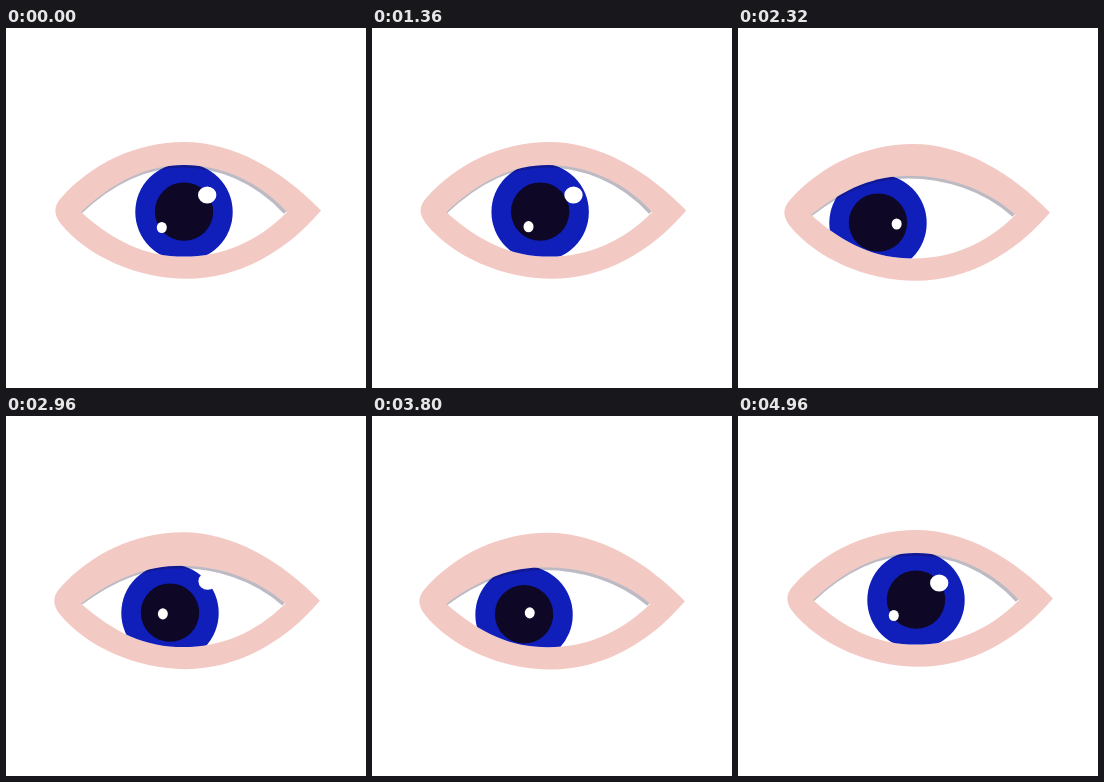
An HTML page that plays this animation: 360x360 px, repeating every 5 s.

```html
<!DOCTYPE html>
<html lang="en">
<head>
<meta charset="utf-8">
<title>Eye</title>
<style>
  html, body { margin: 0; width: 100%; height: 100%; overflow: hidden; background: #fff; }
  svg { display: block; width: 100%; height: 100%; }
</style>
</head>
<body>
<svg viewBox="0 0 360 360">
  <defs><clipPath id="slit"><path id="opening"/></clipPath></defs>
  <path id="skin" fill="#f3c9c4"/>
  <g clip-path="url(#slit)">
    <rect width="360" height="360" fill="#fff"/>
    <g id="iris">
      <circle r="48.7" fill="#101eba"/>
      <circle cy="-.4" r="29.2" fill="#0e0726"/>
    </g>
    <ellipse id="glint" rx="9.2" ry="8.6" fill="#fff"/>
    <ellipse id="spark" rx="5" ry="5.6" fill="#fff"/>
    <path id="shade" fill="none" stroke="#140a28" stroke-width="4.6"/>
  </g>
</svg>
<script>
const LOOP = 5000, STEP = 40;
const el = id => document.getElementById(id);
const [opening, skin, iris, glint, spark, shade] =
  ['opening', 'skin', 'iris', 'glint', 'spark', 'shade'].map(el);

// Progress from 0 to 1 between two times, plain and eased
const ramp = (t, from, to) => Math.min(1, Math.max(0, (t - from) / (to - from)));
const ease = (t, from, to) => {
  const p = ramp(t, from, to);
  return p * p * (3 - 2 * p);
};
const mix = (a, b, p) => a + (b - a) * p;

// Look left, lower the gaze, wander a little, settle below, return
function gaze(t) {
  const wander = ease(t, 2440, 2820) - ease(t, 2980, 3360);
  const settle = ease(t, 3600, 4120);
  const away = 1 - ease(t, 4680, 4920);
  const x = mix(-38 * ease(t, 1310, 1460) + 24 * wander, -1.5, settle);
  const y = mix(11 * ease(t, 1920, 2200) + 2 * wander, 22, settle);
  return [x * away, y * away];
}

// Quick closing, slow opening
const blink = t => ease(t, 600, 720) * (1 - ramp(t, 760, 1000)) ** 3;

function place(node, x, y) {
  node.setAttribute('transform', `translate(${x} ${y})`);
}

function draw(t) {
  const [dx, dy] = gaze(t), shut = blink(t);
  const sx = dx * .08, sy = dy * .18;

  // Inner edge of the lids
  const left = 75 + 8 * shut + sx + dy * .08;
  const right = 281 - 7 * shut + sx - dy * .04;
  const corner = 184 + 7 * shut + sy + dy * .08;
  const top = 137 + 83 * shut + sy + dy * .8;
  const low = 228.6 - 8.6 * shut + sy;
  const mid = 178 + sx, peak = mid + dx * .08;
  const bend = y => mix(corner, y, .7);
  const upper = `M${left} ${corner}C${left + 35} ${bend(top)} ${peak - 35} ${top} ${peak} ${top}` +
    `S${right - 30} ${bend(top)} ${right} ${corner}`;
  opening.setAttribute('d', upper +
    `C${right - 31} ${bend(low)} ${mid + 37} ${low} ${mid} ${low}S${left + 35} ${bend(low)} ${left} ${corner}Z`);
  shade.setAttribute('d', upper);
  shade.setAttribute('stroke-opacity', .28 * Math.max(0, 1 - shut * 4));
  place(shade, -1.5, .3);

  const base = 250.8 - 9 * shut;
  skin.setAttribute('d', 'M315 182.5C277 143 228 114 178 114C130 114 85 136 55 170' +
    `C47 179 48 187 55 196C81 228 131 ${base} 181 ${base}C232 ${base} 280 224 315 182.5Z`);
  place(skin, sx, sy);

  place(iris, 178 + dx, 184 + dy);
  place(glint, 201.2 - dx * .03, 167 - dy * .14);
  place(spark, 155.8 - dx * .075, 199.5 + dx * .08 - dy * .04);
}

function tick() {
  draw(Math.floor(performance.now() % LOOP / STEP) * STEP);
  requestAnimationFrame(tick);
}
tick();
</script>
</body>
</html>
```
